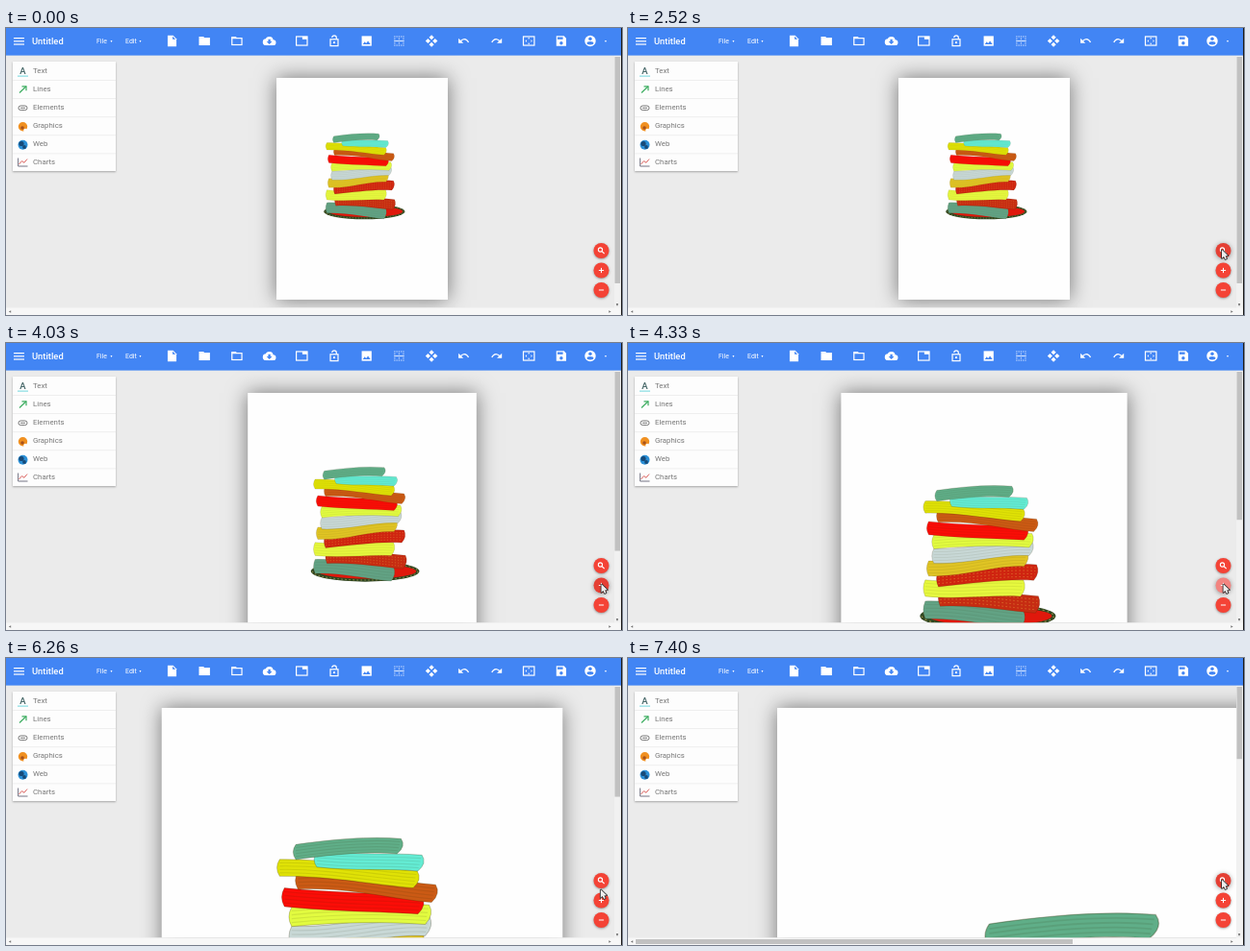
Write an HTML page with a canvas that moves like this. It is 640 px wide and 299 px high and loops after 8000 ms.

```html
<!DOCTYPE html>
<html lang="en">
<head>
<meta charset="utf-8">
<title>Page zoom</title>
<style>
html, body { margin: 0; width: 100%; height: 100%; overflow: hidden; background: #ebebeb; }
canvas { display: block; width: 100vw; height: 100vh; }
</style>
</head>
<body>
<canvas id="stage"></canvas>
<script>
const W = 640, H = 299, LOOP = 8000, TAU = Math.PI * 2;
const BLUE = '#4285f4', RED = '#f44336', WHITE = '#fff';
const canvas = document.getElementById('stage');
const ctx = canvas.getContext('2d');
const dpr = window.devicePixelRatio || 1;
canvas.width = W * dpr;
canvas.height = H * dpr;

// Plus is clicked four times, then the magnifier fits the page to the width.
const PLUS_TIMES = [3730, 4330, 4920, 5400];
const FIT_TIME = 7400, FIT_ZOOM = 3.7, ZOOM_STEP = 0.335;
const RING_MS = 150, PALE_MS = 295;
const SEARCH = [617, 231], PLUS = [618.5, 251];
const MOVES = [
  { start: 1360, end: 2370, steps: 7, from: [535.5, 202], to: SEARCH },
  { start: 2520, end: 3300, steps: 5, from: SEARCH, to: PLUS },
  { start: 5850, end: 6420, steps: 4, from: PLUS, to: SEARCH }
];
const FOLDS = ['#60ae88', '#64ecd4', '#e0e206', '#cb5a14', '#fb0d07', '#e2fb40',
  '#c8d8d6', '#e0c424', '#cf2410', '#e6f83e', '#c62c12', '#62a284'];
const PATTERNED = ['#cf2410', '#c62c12'];

function rect(color, x, y, w, h) {
  ctx.fillStyle = color;
  ctx.fillRect(x, y, w, h);
}

function disc(color, x, y, rx, ry = rx) {
  ctx.fillStyle = color;
  ctx.beginPath();
  ctx.ellipse(x, y, rx, ry, 0, 0, TAU);
  ctx.fill();
}

function trace(pts) {
  ctx.beginPath();
  for (let i = 0; i < pts.length; i += 2) ctx.lineTo(pts[i], pts[i + 1]);
}

function poly(color, ...pts) {
  ctx.fillStyle = color;
  trace(pts);
  ctx.fill();
}

function line(color, width, ...pts) {
  ctx.strokeStyle = color;
  ctx.lineWidth = width;
  trace(pts);
  ctx.stroke();
}

function frameBox(x, y, w, h) {
  ctx.strokeStyle = WHITE;
  ctx.lineWidth = 2.1;
  ctx.strokeRect(x, y, w, h);
}

function text(str, x, y, font, color) {
  ctx.font = font + ' Roboto, sans-serif';
  ctx.fillStyle = color;
  ctx.fillText(str, x, y);
}

function withShadow(color, blur, dy, draw) {
  ctx.save();
  ctx.shadowColor = color;
  ctx.shadowBlur = blur * dpr;
  ctx.shadowOffsetY = dy * dpr;
  draw();
  ctx.restore();
}

function arrow(color, x, y, dx, dy) {
  poly(color, x + dx, y + dy, x - dx - dy, y - dy - dx, x - dx + dy, y - dy + dx);
}

// Toolbar icons are drawn on a 24-unit grid.
function fourTurns(draw) {
  ctx.translate(12, 12);
  for (let i = 0; i < 4; i++) {
    draw();
    ctx.rotate(TAU / 4);
  }
}

function backArrow() {
  poly(WHITE, 2, 7, 2, 16, 11, 16);
  ctx.strokeStyle = WHITE;
  ctx.lineWidth = 2.4;
  ctx.beginPath();
  ctx.arc(12.5, 17, 8, -2.5, -0.3);
  ctx.stroke();
}

const ICONS = [
  function file() {
    poly(WHITE, 4, 2, 14, 2, 20, 8, 20, 22, 4, 22);
    poly(BLUE, 13, 3.5, 13, 9, 18.5, 9);
  },
  function folder() {
    rect(WHITE, 2, 6, 20, 14);
    poly(WHITE, 2, 6, 2, 4, 10, 4, 12, 6);
  },
  function openFolder() {
    frameBox(3, 7, 18, 12);
    poly(WHITE, 2, 7, 2, 4, 10, 4, 13, 7);
  },
  function cloud() {
    disc(WHITE, 6, 14, 6);
    disc(WHITE, 12, 11, 7);
    disc(WHITE, 19, 15, 5);
    rect(WHITE, 6, 14, 13, 6);
    rect(BLUE, 10, 9, 4, 4);
    poly(BLUE, 7, 13, 17, 13, 12, 18);
  },
  function tab() {
    frameBox(2, 4, 20, 16);
    rect(WHITE, 13, 4, 9, 5);
  },
  function lock() {
    frameBox(5, 9, 14, 12);
    disc(WHITE, 12, 15, 2);
    ctx.beginPath();
    ctx.arc(12, 6, 4, Math.PI, 0);
    ctx.lineTo(16, 9);
    ctx.stroke();
  },
  function image() {
    rect(WHITE, 3, 3, 18, 18);
    poly(BLUE, 5, 18, 8.5, 13.5, 11, 16.5, 14.5, 12, 19, 18);
  },
  function border() {
    const tint = '#d5e4ff';
    rect(tint, 3, 11, 18, 2);
    for (let i = 0; i < 5; i++) {
      for (let j = 0; j < 5; j++) {
        if (i % 2 === 0 || j % 4 === 0) rect(tint, 3 + i * 4, 3 + j * 4, 2, 2);
      }
    }
  },
  function move() {
    fourTurns(() => poly(WHITE, 0, -11, 4.5, -6.5, 0, -2, -4.5, -6.5));
  },
  backArrow,
  function redo() {
    ctx.translate(24, 0);
    ctx.scale(-1, 1);
    backArrow();
  },
  function overscan() {
    frameBox(2, 4, 20, 16);
    fourTurns(() => poly(WHITE, 0, -6.5, 2, -4, -2, -4));
  },
  function save() {
    poly(WHITE, 3, 3, 17, 3, 21, 7, 21, 21, 3, 21);
    rect(BLUE, 5, 5, 10, 4);
    disc(BLUE, 12, 16, 3);
  },
  function account() {
    disc(WHITE, 12, 12, 10);
    disc(BLUE, 12, 8, 3);
    disc(BLUE, 12, 16, 6, 3);
  }
];

function header() {
  rect(BLUE, 0, 0, W, 28.6);
  for (let i = 0; i < 3; i++) rect(WHITE, 8, 10 + i * 3.2, 11, 1.2);
  text('Untitled', 27, 17.2, '500 9.4px', WHITE);
  text('File', 94, 16.3, '7px', WHITE);
  text('Edit', 124, 16.3, '7px', WHITE);
  for (const x of [109.5, 139.5, 623]) arrow(WHITE, x, 14, 0, 1);
  ICONS.forEach((draw, i) => {
    ctx.save();
    ctx.translate(Math.min(172.5 + i * 33.7, 607), 13.5);
    ctx.scale(0.57, 0.57);
    ctx.translate(-12, -12);
    draw();
    ctx.restore();
  });
}

function panel() {
  withShadow('rgba(0,0,0,.3)', 2, 0.7, () => rect('#fdfdfd', 7, 35, 107, 114));
  const labels = ['Text', 'Lines', 'Elements', 'Graphics', 'Web', 'Charts'];
  labels.forEach((label, i) => {
    if (i) rect('#ececec', 7, 35 + i * 19.1, 107, 0.8);
    text(label, 28, 47 + i * 18.95, '7.85px', '#777');
  });

  text('A', 14.3, 47.8, '500 9.5px', '#3c5f60');
  rect('#6fd6dc', 12, 49.6, 11, 1);

  line('#3fae62', 1.2, 14, 67.5, 21, 60.8);
  line('#3fae62', 1.2, 16.5, 60.8, 21, 60.8, 21, 65.3);

  ctx.strokeStyle = '#777';
  ctx.lineWidth = 1;
  ctx.beginPath();
  ctx.roundRect(13, 81, 9, 4.6, 2.3);
  ctx.moveTo(15, 83.3);
  ctx.lineTo(20, 83.3);
  ctx.stroke();

  disc('#f09020', 17.5, 102.7, 4.7);
  disc('#a8521c', 17, 104, 1.8);
  disc('#fdfdfd', 20, 106.3, 1.6);

  disc('#2b8fd6', 17.5, 121.7, 5);
  disc('#174a78', 16, 120.5, 2.6);
  disc('#174a78', 19, 124, 1.9);

  line('#667', 0.9, 12.6, 135.5, 12.6, 144, 22.5, 144);
  line('#d9534f', 0.9, 13.5, 142, 16.5, 138.6, 19, 140.3, 22, 136.5);
}

// One folded towel: an S-curved band whose size, tilt and offset follow its place in the stack.
function fold(color, i) {
  const half = i < 2 ? 39 : 51;
  const x0 = 367 + 8 * Math.cos(TAU * (i - 1) / 2.25) - half;
  const w = half * 2;
  const thick = (8.6 + 0.5 * i) * 1.3;
  const tilt = 10 * Math.sin((i - 0.6) * 0.75);
  const top = 157 + 8.6 * i + 0.26 * i * i - thick / 2;
  const bend = 4 * Math.sin(i * 2.4 - 1.5);
  const pattern = PATTERNED.includes(color);

  const edge = (k, back) => {
    const l = [x0, top - tilt / 2 + thick * k];
    const r = [x0 + w - 3 * k, top + tilt / 2 + thick * k];
    const c = [x0 + w * 0.35, l[1] + bend], d = [x0 + w * 0.7, r[1] - 2];
    if (!back) ctx.moveTo(...l);
    ctx.bezierCurveTo(...(back ? [...d, ...c, ...l] : [...c, ...d, ...r]));
  };

  ctx.save();
  ctx.beginPath();
  edge(0, false);
  ctx.quadraticCurveTo(x0 + w + 4, top + (tilt + thick) / 2, x0 + w - 3, top + tilt / 2 + thick);
  edge(1, true);
  ctx.quadraticCurveTo(x0 - 4, top + (thick - tilt) / 2, x0, top - tilt / 2);
  ctx.fillStyle = color;
  ctx.fill();
  ctx.strokeStyle = 'rgba(50,40,0,.3)';
  ctx.lineWidth = 0.6;
  ctx.stroke();
  ctx.lineWidth = 0.8;
  ctx.strokeStyle = pattern ? 'rgba(240,190,70,.5)' : 'rgba(40,40,0,.1)';
  if (pattern) ctx.setLineDash([1.5, 2.5]);
  for (let k = 0.2; k < 1; k += 0.2) {
    ctx.beginPath();
    edge(k, false);
    ctx.stroke();
  }
  ctx.restore();
}

function tray() {
  disc('#2f4520', 373.5, 284.5, 70.5, 13.5);
  ctx.strokeStyle = '#8d8743';
  ctx.lineWidth = 1.3;
  ctx.setLineDash([2, 3]);
  ctx.beginPath();
  ctx.ellipse(373.5, 284.5, 68.5, 11.5, 0, 0, TAU);
  ctx.stroke();
  ctx.setLineDash([]);
  disc('#e0180c', 376, 284.5, 64, 9.5);
}

function page(zoom) {
  const left = Math.max(155, 370 - 89 * zoom);
  ctx.save();
  ctx.beginPath();
  ctx.rect(0, 28, 632, 263.5);
  ctx.clip();
  withShadow('rgba(0,0,0,.5)', 20, 0, () => rect('#fefefe', left, 52, 178 * zoom, 231 * zoom));
  // The stack is laid out in the coordinates of the second zoom step.
  const k = zoom / (1 + 2 * ZOOM_STEP);
  ctx.translate(left, 52);
  ctx.scale(k, k);
  ctx.translate(-221, -52);
  tray();
  for (let i = FOLDS.length - 1; i >= 0; i--) fold(FOLDS[i], i);
  ctx.restore();
}

function scrollbars(zoom) {
  rect('#f1f1f1', 632, 29, 7, 263);
  rect('#c1c1c1', 632.5, 30, 5.5, 68900 / (231 * zoom + 61));
  arrow('#555', 635, 288.5, 0, 1.2);
  rect('#f7f7f7', 0, 291.5, W, 7.5);
  if (zoom === FIT_ZOOM) rect('#c1c1c1', 8, 293, 454, 5);
  arrow('#777', 4, 295.5, -1.2, 0);
  arrow('#777', 627.5, 295.5, 1.2, 0);
}

function buttons(cursor, t) {
  const x = 618.5;
  ['search', 'plus', 'minus'].forEach((name, i) => {
    const y = 232 + i * 20.5;
    const hover = cursor && Math.hypot(cursor[0] - x, cursor[1] - y) < 8;
    const pale = name === 'plus' && PLUS_TIMES.some(p => t >= p && t < p + PALE_MS);
    const color = pale ? '#f28480' : hover ? '#e53f34' : RED;
    withShadow('rgba(0,0,0,.4)', hover ? 5 : 2.5, 0.8, () => disc(color, x, y, 8));
    if (name === 'search') {
      ctx.strokeStyle = WHITE;
      ctx.lineWidth = 1.1;
      ctx.beginPath();
      ctx.arc(x - 1, y - 1, 2.1, 0, TAU);
      ctx.stroke();
      line(WHITE, 1.2, x + 0.6, y + 0.6, x + 3.2, y + 3.2);
    } else {
      rect(WHITE, x - 2.6, y - 0.5, 5.2, 1);
      if (name === 'plus') rect(WHITE, x - 0.5, y - 2.6, 1, 5.2);
    }
  });
}

function pointer(x, y) {
  ctx.save();
  ctx.translate(x, y);
  ctx.lineJoin = 'round';
  const shape = [0, 0, 0, 9, 2, 7, 3.5, 10, 5, 9.3, 3.7, 6.4, 6.4, 6.2, 0, 0];
  line('#222', 1.6, ...shape);
  poly('#eee', ...shape);
  ctx.restore();
}

function zoomAt(t) {
  if (t >= FIT_TIME) return FIT_ZOOM;
  return 1 + ZOOM_STEP * PLUS_TIMES.filter(p => t >= p).length;
}

function cursorAt(t) {
  const move = MOVES.filter(m => t >= m.start).pop();
  if (!move) return null;
  const p = Math.min(1, (t - move.start) / (move.end - move.start));
  const q = Math.floor(p * move.steps + 1e-6) / move.steps;
  const eased = q * q * (3 - 2 * q);
  return move.from.map((v, i) => v + (move.to[i] - v) * eased);
}

function render(t) {
  const zoom = zoomAt(t);
  const cursor = cursorAt(t);
  ctx.setTransform(canvas.width / W, 0, 0, canvas.height / H, 0, 0);
  rect('#ebebeb', 0, 0, W, H);
  page(zoom);
  scrollbars(zoom);
  header();
  panel();
  buttons(cursor, t);
  if ([...PLUS_TIMES, FIT_TIME].some(c => t >= c - RING_MS && t < c)) {
    ctx.strokeStyle = '#e5404a';
    ctx.lineWidth = 1.5;
    ctx.beginPath();
    ctx.arc(cursor[0] + 1.5, cursor[1] + 1, 15, 0, TAU);
    ctx.stroke();
  }
  if (cursor) pointer(...cursor);
  rect('#1c1c1c', 639, 0, 1, H);
}

const begin = performance.now();
function frame() {
  render((performance.now() - begin) % LOOP);
  requestAnimationFrame(frame);
}
frame();
</script>
</body>
</html>
```
